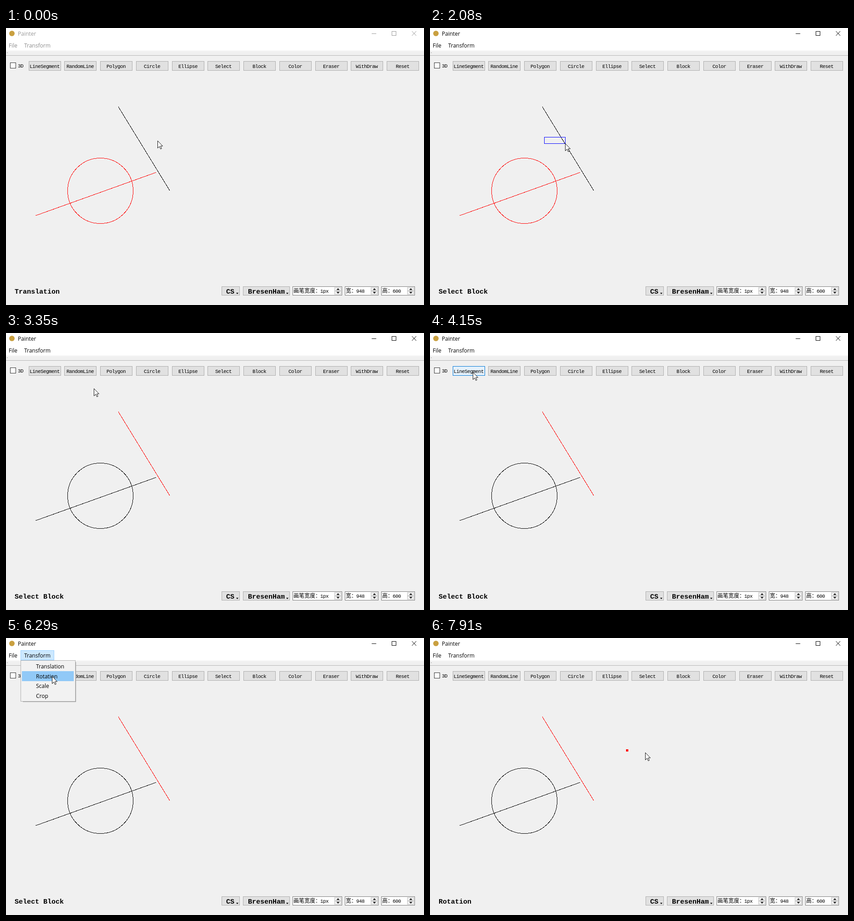
Write an HTML page that moves like this. It is 919x610 px and loops after 8 s.

```html
<!DOCTYPE html>
<html lang="en">
<head>
<meta charset="utf-8">
<title>Painter</title>
<style>
html, body { margin: 0; width: 100%; height: 100%; overflow: hidden; background: #f0f0f0; }
svg { display: block; width: 919px; height: 610px; }
text { white-space: pre; }
.ui { font: 12px "Open Sans", "Noto Sans", sans-serif; }
.mono { font: 11px "Liberation Mono", "Noto Sans CJK SC", "Noto Sans CJK", monospace; letter-spacing: -0.6px; }
.han { font: 12px "Noto Sans CJK SC", "Noto Sans CJK", sans-serif; }
.big { font: bold 15px "Liberation Mono", monospace; }
.crisp { shape-rendering: crispEdges; }
</style>
</head>
<body>
<svg id="stage" viewBox="0 0 919 610"></svg>
<script>
const LOOP = 8000;
const stage = document.getElementById('stage');

function add(tag, attrs, parent = stage) {
  const el = document.createElementNS('http://www.w3.org/2000/svg', tag);
  set(el, attrs);
  parent.appendChild(el);
  return el;
}
function set(el, attrs) {
  for (const k in attrs) el.setAttribute(k, attrs[k]);
}
function text(x, y, str, cls, parent, extra = {}) {
  const el = add('text', { x, y, class: cls, ...extra }, parent);
  el.textContent = str;
  return el;
}
function fill(x, y, width, height, color, parent) {
  return add('rect', { x, y, width, height, fill: color, class: 'crisp' }, parent);
}
// Box with a one pixel border inside its bounds
function box(x, y, w, h, color, border, parent) {
  return add('rect', { x: x + .5, y: y + .5, width: w - 1, height: h - 1,
    fill: color, stroke: border, class: 'crisp' }, parent);
}
function path(d, attrs, parent) {
  return add('path', { d, fill: 'none', ...attrs }, parent);
}

// Title bar and menu bar
fill(0, 0, 919, 610, '#f0f0f0');
fill(0, 0, 919, 49, '#fff');
fill(0, 49, 919, 2, '#f7f7f7');
fill(0, 60, 919, 1, '#b4b4b4');
fill(2, 54, 2, 1, '#a0a0a0');
add('circle', { cx: 13, cy: 12, r: 6, fill: '#c9a040' });
const chrome = add('g', {});
text(26, 17, 'Painter', 'ui', chrome);
const winIcons = add('g', { fill: 'none' });
path('M804 12.5H814M848.5 7.5H857.5V16.5H848.5Z', { class: 'crisp' }, winIcons);
path('M892.5 7L902 17M902 7L892.5 17', {}, winIcons);
const menuHot = box(32, 27, 74, 22, '#cce8ff', '#99d1ff');
const menuBar = add('g', {});
text(6, 43, 'File', 'ui', menuBar);
text(40, 43, 'Transform', 'ui', menuBar);

// Tool buttons
box(9, 76, 13, 13, '#fff', '#333');
text(26, 87, '3D', 'mono');
const buttons = ['LineSegment', 'RandomLine', 'Polygon', 'Circle', 'Ellipse', 'Select',
  'Block', 'Color', 'Eraser', 'WithDraw', 'Reset'].map((name, i) => {
  const x = Math.round(49.6 + 78.75 * i);
  const el = box(x, 73, 71, 21, '#e1e1e1', '#adadad');
  text(x + 35, 88, name, 'mono', stage, { 'text-anchor': 'middle' });
  return { x, el };
});

// Status row
const label = text(19, 585, '', 'big');
function dropDown(x, w, tx, name) {
  box(x, 569, w, 20, '#e1e1e1', '#adadad');
  text(tx, 585, name, 'big');
  path(`M${x + w - 8} 583h5l-2.5 3z`, { fill: '#000' });
}
dropDown(474, 40, 484, 'CS');
dropDown(521, 103, 532, 'BresenHam');
function spinBox(x, w, name, value) {
  box(x, 569, w, 20, '#fff', '#7a7a7a');
  text(x + 2, 583, name, 'han');
  text(x + 1 + 12 * name.length, 583, value, 'mono');
  const bx = x + w - 17, cx = bx + 8;
  box(bx, 571, 15, 8, '#f0f0f0', '#c4c4c4');
  box(bx, 579, 15, 8, '#f0f0f0', '#c4c4c4');
  path(`M${cx - 3.5} 577h7l-3.5 -4zM${cx - 3.5} 581h7l-3.5 4z`, { fill: '#222' });
}
spinBox(630, 109, '画笔宽度：', '1px');
spinBox(745, 74, '宽：', '948');
spinBox(825, 74, '高：', '600');

// Drawing
const pen = { class: 'crisp', 'stroke-width': 1 };
const steep = path('M247 173.5L360 358', pen);
const flat = path('M65.5 413L330 318', pen);
const circle = add('circle', { cx: 207.5, cy: 358.5, r: 72, fill: 'none', ...pen });
const band = add('rect', { x: 251.5, y: 240.5, fill: 'none', stroke: '#00f', class: 'crisp' });
const pivot = fill(431, 245, 5, 5, '#f00');

// Transform menu
const menu = add('g', {});
fill(37, 139, 117, 2, '#a6a6a6', menu);
fill(152, 53, 2, 88, '#a6a6a6', menu);
box(32, 49, 121, 91, '#f2f2f2', '#b0b0b0', menu);
const rowHot = fill(35, 73, 114, 22, '#91c9f7', menu);
['Translation', 'Rotation', 'Scale', 'Crop'].forEach((name, i) =>
  text(66, 67 + Math.round(21.5 * i), name, 'ui', menu));

const cursor = path('M.5 .5V16.5L4.2 12.9L6.8 18.5L9.2 17.4L6.7 12H11.5Z',
  { fill: '#fff', stroke: '#111', 'stroke-width': 1 });

// Pointer path: time, x, y
const track = [
  [0, 333, 248], [230, 333, 248], [620, 450, 165], [1030, 548, 84], [1190, 548, 84],
  [1450, 462, 152], [1830, 251, 240], [1980, 251, 240], [2080, 297, 254], [2500, 349, 273],
  [2870, 349, 273], [3350, 193, 122], [3650, 88, 84], [3700, 88, 84], [4140, 94, 86],
  [4330, 94, 86], [4640, 155, 173], [5030, 93, 45], [5520, 93, 45], [5880, 99, 87],
  [5950, 99, 87], [5960, 100, 87], [6210, 100, 87], [6220, 101, 84], [6390, 101, 84],
  [6700, 290, 190], [7020, 419, 246], [7040, 419, 246], [7270, 432, 247], [7500, 432, 247],
  [7740, 467, 256], [7900, 473, 252], [8000, 473, 252]
];

// Slope at a key; zero next to a pause
function slope(i, axis) {
  const a = track[i - 1], b = track[i], c = track[i + 1];
  if (!a || !c) return 0;
  const still = (p, q) => p[1] === q[1] && p[2] === q[2];
  return still(a, b) || still(b, c) ? 0 : (c[axis] - a[axis]) / (c[0] - a[0]);
}
function pointer(t) {
  let i = 0;
  while (i < track.length - 2 && t >= track[i + 1][0]) i++;
  const a = track[i], b = track[i + 1], d = b[0] - a[0], u = (t - a[0]) / d;
  const u2 = u * u, u3 = u2 * u;
  return [1, 2].map(k => Math.round(
    (2 * u3 - 3 * u2 + 1) * a[k] + (u3 - 2 * u2 + u) * d * slope(i, k) +
    (3 * u2 - 2 * u3) * b[k] + (u3 - u2) * d * slope(i + 1, k)));
}

const show = (el, on) => el.setAttribute('visibility', on ? 'visible' : 'hidden');

function draw(t) {
  const [x, y] = pointer(t);
  const active = t >= 1100, picked = t >= 2610, menuOpen = t >= 5200 && t < 6390;

  cursor.setAttribute('transform', `translate(${x} ${y})`);
  chrome.setAttribute('fill', active ? '#000' : '#999');
  menuBar.setAttribute('fill', active ? '#000' : '#8c8c8c');
  winIcons.setAttribute('stroke', active ? '#000' : '#999');
  label.textContent = t < 1190 ? 'Translation' : t < 6390 ? 'Select Block' : 'Rotation';

  for (const b of buttons) {
    const hot = !menuOpen && y >= 73 && y < 94 && x >= b.x && x < b.x + 71;
    const down = hot && t >= 1100 && t < 1190;
    set(b.el, {
      fill: down ? '#cce4f7' : hot ? '#e5f1fb' : '#e1e1e1',
      stroke: down ? '#005499' : hot ? '#0078d7' : '#adadad'
    });
  }

  steep.setAttribute('stroke', picked ? '#f00' : '#000');
  flat.setAttribute('stroke', picked ? '#000' : '#f00');
  circle.setAttribute('stroke', picked ? '#000' : '#f00');
  show(band, t >= 1980 && !picked);
  set(band, { width: Math.max(0, x - 251), height: Math.max(0, y - 240) });
  show(pivot, t >= 7500);

  const overBar = x >= 32 && x < 106 && y >= 27 && y < 49;
  show(menuHot, menuOpen || overBar);
  set(menuHot, t < 5140 ? { fill: '#e5f3ff', stroke: '#cce8ff' } : { fill: '#cce8ff', stroke: '#99d1ff' });
  show(menu, menuOpen);
  menu.setAttribute('opacity', Math.min(1, Math.max(0, (t - 5210) / 200)));
  const row = Math.floor((y - 52) / 21.5);
  rowHot.setAttribute('y', 52 + Math.floor(21.5 * row));
  show(rowHot, menuOpen && row >= 0 && row < 4);
}

const start = performance.now();
function tick() {
  draw((performance.now() - start) % LOOP);
  requestAnimationFrame(tick);
}
tick();
</script>
</body>
</html>
```
